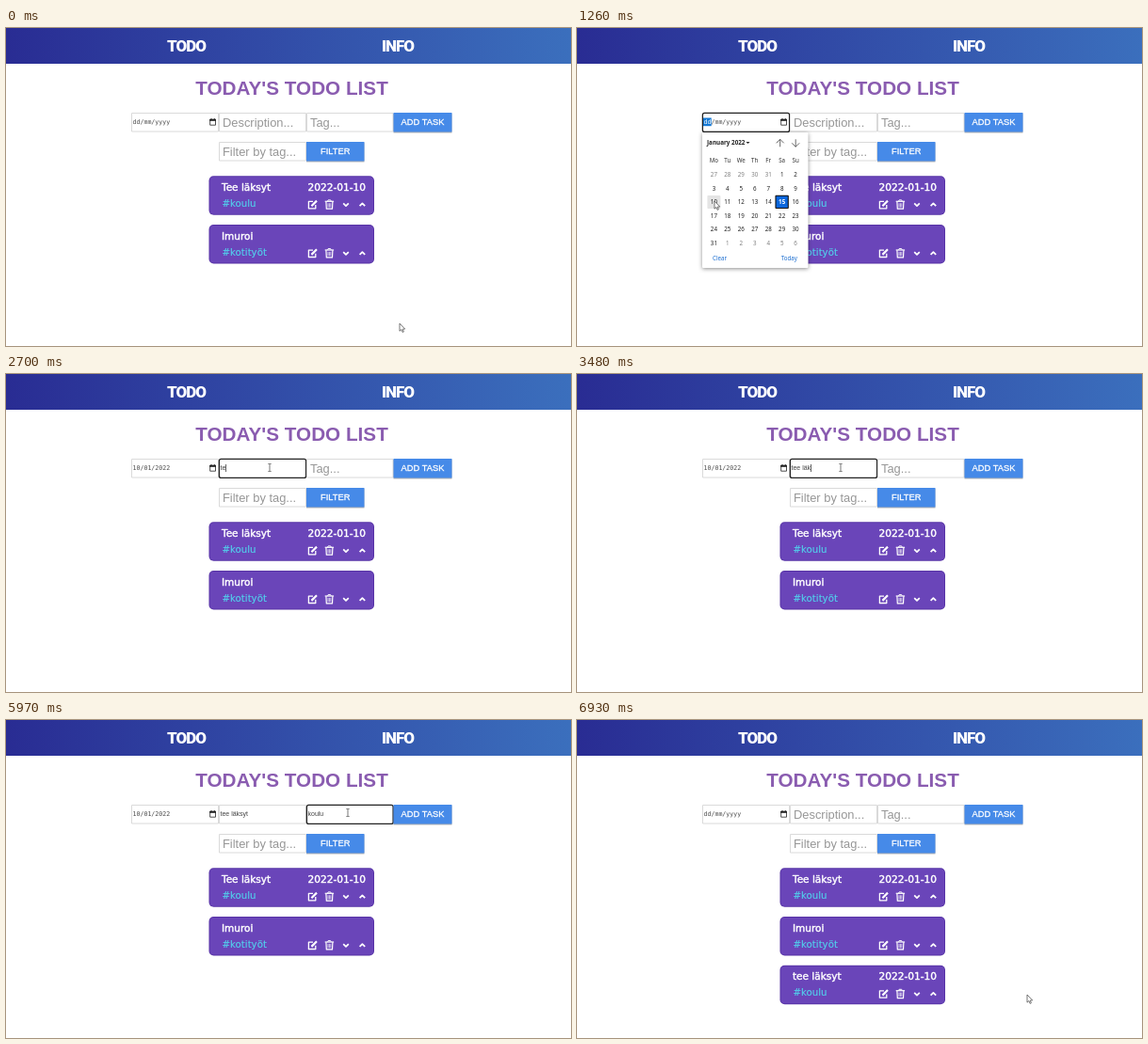
These frames come from a looping animation (600x338 px, 6960 ms). An HTML page with a canvas:

```html
<!DOCTYPE html>
<html lang="en">
<head>
<meta charset="utf-8">
<title>Todo list</title>
<style>
html, body { margin: 0; width: 100%; height: 100%; overflow: hidden; background: #fff; }
canvas { display: block; width: 600px; height: 338px; }
</style>
</head>
<body>
<canvas id="stage"></canvas>
<script>
const LOOP = 6960, W = 600, H = 338;
const canvas = document.getElementById('stage');
const ctx = canvas.getContext('2d');
const dpr = window.devicePixelRatio || 1;
canvas.width = W * dpr;
canvas.height = H * dpr;

const SANS = '"Liberation Sans", Arial, sans-serif';
const CARD = '"DejaVu Sans", Verdana, sans-serif';
const MONO = '"DejaVu Sans Mono", monospace';
const UI = '"Noto Sans", "Open Sans", sans-serif';

// Heavy menu face: the narrowest one installed
const MENU = ['Roboto', 'Open Sans', 'Noto Sans', 'Inter']
  .map(name => `900 extra-condensed 17px "${name}", sans-serif`)
  .map(font => {
    ctx.font = font;
    return { font, width: ctx.measureText('TODO').width };
  })
  .sort((a, b) => a.width - b.width)[0].font;

// Moments of the interaction, in ms
const OPEN = 750, PICK = 1440, FOCUS_DESC = 1890, FOCUS_TAG = 4590, ADD = 6450;
const DESC_KEYS = [2610, 2700, 2790, 2910, 3030, 3180, 3330, 3510, 3600, 3690];
const TAG_KEYS = [5100, 5190, 5310, 5400, 5490];

// Pointer path: time, x, y
const PATH = [
  [0, 418, 314], [30, 418, 314], [660, 218, 101], [840, 218, 101],
  [1260, 146, 184], [1440, 146, 184], [1830, 280, 99.5], [4200, 280, 99.5],
  [4620, 349, 98.5], [5940, 349, 98.5], [5970, 363, 98.5], [6300, 442, 101],
  [6570, 442, 101], [6900, 478, 292], [LOOP, 478, 292]
];

// A small weight thickens the letters slightly
function text(str, x, y, font, color, align = 'left', weight = 0) {
  ctx.font = font;
  ctx.fillStyle = color;
  ctx.textAlign = align;
  ctx.fillText(str, x, y);
  if (weight) {
    ctx.strokeStyle = color;
    ctx.lineWidth = weight;
    ctx.strokeText(str, x, y);
  }
}

function box(x, y, w, h, fill, r = 0) {
  ctx.beginPath();
  ctx.roundRect(x, y, w, h, r);
  ctx.fillStyle = fill;
  ctx.fill();
}

function line(points, color, width) {
  ctx.beginPath();
  points.forEach(([x, y], i) => i ? ctx.lineTo(x, y) : ctx.moveTo(x, y));
  ctx.strokeStyle = color;
  ctx.lineWidth = width;
  ctx.stroke();
}

function shadowBox(x, y, w, h, blur, alpha) {
  ctx.save();
  ctx.shadowColor = `rgba(0,0,0,${alpha})`;
  ctx.shadowBlur = blur * dpr;
  ctx.shadowOffsetY = dpr;
  box(x, y, w, h, '#fff', 1);
  ctx.restore();
}

function header() {
  const g = ctx.createLinearGradient(0, 0, W, 0);
  g.addColorStop(0, '#292c93');
  g.addColorStop(1, '#3b6fbd');
  box(0, 0, W, 38, g);
  ctx.save();
  ctx.letterSpacing = '-1px';
  text('TODO', 191.5, 25, MENU, '#fff', 'center');
  text('INFO', 416, 25, MENU, '#fff', 'center');
  ctx.restore();
  text("TODAY'S TODO LIST", 303.5, 71, 'bold 20.7px ' + SANS, '#8a5cb0', 'center');
}

function field(x, y, w, focused) {
  ctx.beginPath();
  if (focused) {
    ctx.roundRect(x + 0.4, y + 0.4, w - 0.8, 20, 2);
    ctx.strokeStyle = '#222';
    ctx.lineWidth = 1.3;
  } else {
    ctx.rect(x + 0.5, y + 0.5, w - 1, 19.5);
    ctx.strokeStyle = '#dadada';
    ctx.lineWidth = 1;
  }
  ctx.stroke();
}

function hint(str, x, y) {
  text(str, x, y, '12.9px ' + SANS, '#979797');
}

function button(label, x, y, w) {
  box(x, y + 1, w, 20.5, 'rgba(0,0,0,0.3)');
  box(x, y, w, 20.5, '#468ae8');
  text(label, x + w / 2, y + 13.4, '9.3px ' + SANS, '#fff', 'center', 0.3);
}

function dateField(t) {
  const focused = t >= OPEN && t < FOCUS_DESC;
  const filled = t >= PICK && t < ADD;
  const value = filled ? '10/01/2022' : 'dd/mm/yyyy';
  const font = '6.6px ' + MONO;
  field(133, 90, 93, focused);
  text(value, 134.5, 102.3, font, '#4a4a4a');
  if (focused) {
    box(134, 95.5, 8.7, 8.7, '#1478d4');
    text(value.slice(0, 2), 134.5, 102.3, font, '#fff');
  }
  line([[216.7, 97.4], [222.5, 97.4], [222.5, 103.2], [216.7, 103.2], [216.7, 97]], '#222', 0.8);
  box(216.3, 96.8, 6.6, 2, '#222');
  box(217.6, 96, 0.9, 1, '#222');
  box(220.8, 96, 0.9, 1, '#222');
}

function textField(x, w, label, value, focused, caret) {
  field(x, 90, w, focused);
  const font = '7px ' + SANS;
  if (value) text(value, x + 1.5, 102, font, '#444');
  else hint(label, x + 4, 105);
  if (caret) {
    ctx.font = font;
    box(x + 1.5 + ctx.measureText(value).width, 96, 0.7, 8, '#222');
  }
}

function typed(word, keys, t) {
  return t < ADD ? word.slice(0, keys.filter(k => k <= t).length) : '';
}

function form(t) {
  dateField(t);
  const inDesc = t >= FOCUS_DESC && t < FOCUS_TAG;
  const inTag = t >= FOCUS_TAG && t < 6330;
  const descCaret = inDesc && !(t >= 2340 && t < 2610);
  const tagCaret = inTag && !(t >= 4920 && t < 5100) && t < 5520;
  textField(226, 93, 'Description...', typed('tee läksyt', DESC_KEYS, t), inDesc, descCaret);
  textField(319, 92.5, 'Tag...', typed('koulu', TAG_KEYS, t), inTag, tagCaret);
  button('ADD TASK', 411.5, 90, 62);
  field(226, 121, 93, false);
  hint('Filter by tag...', 230, 136.3);
  button('FILTER', 319, 121, 61.5);
}

function icons(y) {
  const c = '#fff';
  // pencil on a sheet
  line([[326, y - 3.2], [321.4, y - 3.2], [321.4, y + 4.2], [328.8, y + 4.2], [328.8, y + 0.5]], c, 1.3);
  line([[324.4, y + 1.6], [330, y - 4]], c, 2.2);
  // bin
  line([[338.7, y - 3.3], [348.1, y - 3.3]], c, 1.2);
  line([[341.5, y - 3.5], [342.1, y - 4.7], [344.7, y - 4.7], [345.3, y - 3.5]], c, 1);
  line([[339.9, y - 3], [340.3, y + 4.6], [346.5, y + 4.6], [346.9, y - 3]], c, 1.2);
  for (const x of [342, 343.4, 344.8]) line([[x, y - 1.4], [x, y + 3]], c, 0.7);
  line([[358.2, y - 1.2], [361, y + 1.6], [363.8, y - 1.2]], c, 1.7);
  line([[375.6, y + 1.6], [378.4, y - 1.2], [381.2, y + 1.6]], c, 1.7);
}

function card(y, title, tag, date) {
  box(215.5, y, 175.5, 41.5, '#5733a6', 5);
  box(216.5, y + 1, 173.5, 39.5, '#6a45b9', 4);
  text(title, 229, y + 15.6, '10.5px ' + CARD, '#fff', 'left', 0.45);
  text(date, 382, y + 15.6, '10.6px ' + CARD, '#fff', 'right', 0.45);
  text(tag, 229.5, y + 32.6, '10.2px ' + CARD, '#52d0ec', 'left', 0.15);
  icons(y + 30.3);
}

function arrow(x, y, dir) {
  line([[x, y - 4 * dir], [x, y + 4 * dir]], '#444', 0.8);
  line([[x - 4, y], [x, y + 4 * dir], [x + 4, y]], '#444', 0.8);
}

function calendar(t) {
  if (t < OPEN || t >= PICK) return;
  shadowBox(133, 111, 112.5, 144, 4, 0.45);
  text('January 2022', 138, 124.3, '600 6.3px ' + UI, '#222');
  ctx.beginPath();
  ctx.moveTo(179.5, 120.9);
  ctx.lineTo(183.5, 120.9);
  ctx.lineTo(181.5, 123.1);
  ctx.fill();
  arrow(215.7, 122.3, -1);
  arrow(232.2, 122.3, 1);
  const font = '6.2px ' + UI;
  const colX = i => 145.4 + i * 14.45;
  'Mo Tu We Th Fr Sa Su'.split(' ').forEach((d, i) => text(d, colX(i), 143.3, font, '#333', 'center'));
  const [px, py] = pointer(t);
  for (let i = 0; i < 42; i++) {
    const x = colX(i % 7), y = 156 + Math.floor(i / 7) * 14.45;
    const day = i - 4, today = day === 15;
    const inside = day >= 1 && day <= 31;
    const shown = day < 1 ? day + 31 : inside ? day : day - 31;
    if (today) {
      box(x - 7.2, y - 7.2, 14.4, 14.4, '#111', 1);
      box(x - 6.1, y - 6.1, 12.2, 12.2, '#0b66dc');
    } else if (Math.abs(px - x) < 7.2 && Math.abs(py - y) < 7.2) {
      box(x - 7, y - 7, 14, 14, '#e4e4e4', 1);
    }
    text(shown, x, y + 2.3, (today ? 'bold ' : '') + font, today ? '#fff' : inside ? '#222' : '#808080', 'center');
  }
  text('Clear', 144, 246.5, font, '#1a6dd0');
  text('Today', 234, 246.5, font, '#1a6dd0', 'right');
}

function suggestion(t) {
  if (t < TAG_KEYS[0] || t >= TAG_KEYS[2]) return;
  shadowBox(319, 111, 99, 26.5, 3, 0.4);
  text('kotityöt', 325, 127, '6.6px ' + UI, '#333');
}

function pointer(t) {
  const i = PATH.findIndex(p => p[0] > t);
  const [t0, x0, y0] = PATH[i - 1], [t1, x1, y1] = PATH[i];
  const u = (t - t0) / (t1 - t0), e = u * u * (3 - 2 * u);
  return [x0 + (x1 - x0) * e, y0 + (y1 - y0) * e];
}

function cursor(t) {
  const [x, y] = pointer(t);
  const overText = (x > 226 && x < 411 && y > 90 && y < 111) || (x > 226 && x < 319 && y > 121 && y < 142);
  if (overText) {
    line([[x, y - 3.8], [x, y + 3.8]], '#555', 0.8);
    for (const d of [-4, 4]) line([[x - 1.7, y + d], [x + 1.7, y + d]], '#555', 0.7);
    return;
  }
  const shape = [[0, 0], [0, 8.2], [1.9, 6.5], [3.1, 9.4], [4.4, 8.8], [3.2, 6.1], [5.7, 6]];
  ctx.beginPath();
  for (const [dx, dy] of shape) ctx.lineTo(x + dx, y + dy);
  ctx.closePath();
  ctx.fillStyle = '#fff';
  ctx.fill();
  ctx.strokeStyle = '#555';
  ctx.lineWidth = 0.8;
  ctx.stroke();
}

function draw(t) {
  ctx.setTransform(dpr, 0, 0, dpr, 0, 0);
  ctx.lineJoin = 'round';
  box(0, 0, W, H, '#fff');
  header();
  form(t);
  card(157.3, 'Tee läksyt', '#koulu', '2022-01-10');
  card(209, 'Imuroi', '#kotityöt', '');
  if (t >= ADD) card(260.7, 'tee läksyt', '#koulu', '2022-01-10');
  calendar(t);
  suggestion(t);
  cursor(t);
}

const start = performance.now();
function tick() {
  draw((performance.now() - start) % LOOP);
  requestAnimationFrame(tick);
}
draw(0);
requestAnimationFrame(tick);
</script>
</body>
</html>
```
